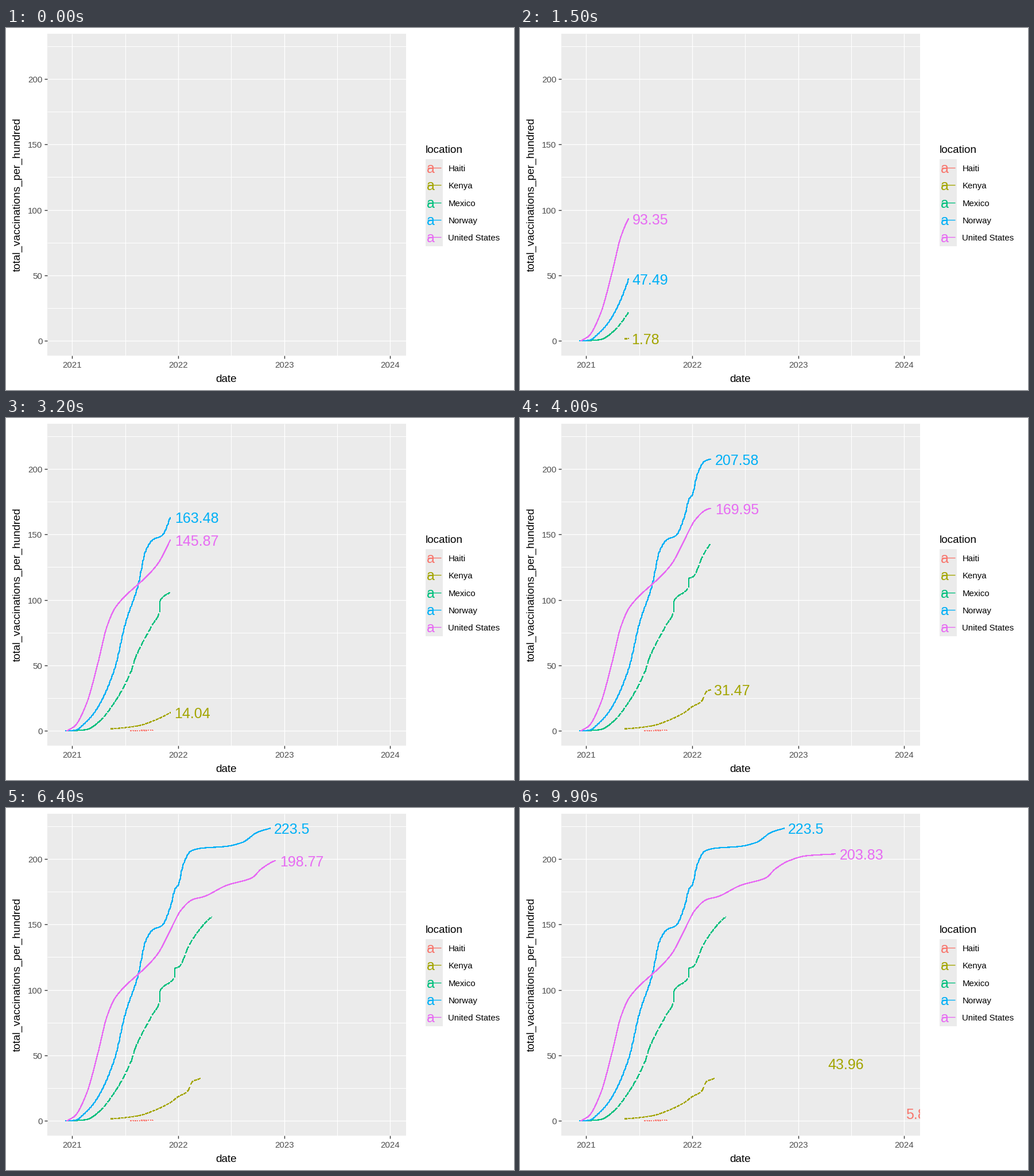
A matplotlib script for the animation above (10 s loop, 885x632 px).

```python
import numpy as np
import matplotlib.pyplot as plt
from matplotlib.animation import FuncAnimation
from matplotlib.patches import Rectangle

W, H, DPI = 885, 632, 100
FRAMES = 100
X0, STEP = 103.7, 5.71            # reveal position in pixels per frame
ZERO, UNIT = 546.3, 2.2865        # pixel row of 0, pixels per value unit
WEEK = 3.54                       # pixels per week
SMALL, TITLE, BIG = 15, 19, 25
DATA_LINE, MAJOR, MINOR = 1.2, 1.4, 1

plt.rcParams["font.family"] = "Liberation Sans"


def pt(px):
    return px * 72 / DPI


def row(value):
    return ZERO - UNIT * np.asarray(value)


def smooth(knots):
    """Monotone cubic curve through a few key points."""
    kx, kv = np.array(knots, float).T
    h = np.diff(kx)
    d = np.diff(kv) / h
    inner = 2 * d[:-1] * d[1:] / np.maximum(d[:-1] + d[1:], 1e-9)
    m = np.concatenate([[d[0]], inner, [d[-1]]])

    def curve(x):
        x = np.clip(x, kx[0], kx[-1])
        i = np.clip(np.searchsorted(kx, x, side="right") - 1, 0, len(h) - 1)
        t = (x - kx[i]) / h[i]
        return (kv[i] + h[i] * t * (m[i] + t * (
            3 * d[i] - 2 * m[i] - m[i + 1]
            + t * (m[i] + m[i + 1] - 2 * d[i]))))

    return curve


class Series:
    def __init__(self, color, knots, final=None, dash=None, solid=0, ripple=0):
        self.color, self.final = color, final
        self.first, self.last = knots[0][0], knots[-1][0]
        self.curve = smooth(knots)
        self.dash, self.solid = dash, solid
        x = np.append(np.arange(self.first, self.last, .25), self.last)
        warped = x + ripple * np.sin(2 * np.pi * x / WEEK)
        self.x = x
        self.y = np.where(self.reported(x), row(self.curve(warped)), np.nan)

    def reported(self, x):
        """True where data exist: regular dashes after a solid start."""
        inside = (x >= self.first) & (x <= self.last)
        if self.dash:
            start, length, period = self.dash
            inside &= (x < self.solid) | ((x - start) % period < length)
        return inside

    def spot(self, tip):
        if self.final and tip >= self.final[0]:
            return self.final
        if self.reported(np.float64(tip)):
            return tip, float(self.curve(tip))
        return None


# Key points are (x pixel, value); dash is (start, length, period)
SERIES = {
    "Haiti": Series(
        "#F8766D", [(217, .1), (230, .25), (256, .5)],
        final=(667.5, 5.85), dash=(217, 1.6, 3.8)),
    "Kenya": Series(
        "#A3A500",
        [(182, 1.6), (189.35, 1.78), (230, 3.9), (258, 7.9), (286.42, 14.04),
         (300, 18.5), (316, 22.5), (325, 30), (339, 32.5)],
        final=(530.5, 43.96), dash=(188.35, 4.3, 6.067)),
    "Mexico": Series(
        "#00BF7D",
        [(111, 0), (140, 1), (162, 7), (189.35, 22), (218, 45.5), (226, 56.5),
         (255, 81), (267.6, 91), (268, 99), (294, 110), (294.4, 116.5),
         (301, 117.5), (320, 135), (345, 150.3), (358.5, 156)],
        dash=(190, 5.17, 6.471), solid=165, ripple=.3),
    "Norway": Series(
        "#00B0F6",
        [(103.8, 0), (120, .5), (140, 7), (160, 18), (189.35, 47.49),
         (208, 82), (230, 111), (243, 137), (255, 145.7), (272, 149.3),
         (286.42, 163.48), (295, 177.5), (300, 180), (309, 196), (322, 206),
         (340, 208.2), (383.49, 209.64), (412, 212.7), (438, 220.4),
         (460.5, 223.5)],
        final=(460.5, 223.5), ripple=.45),
    "United States": Series(
        "#E76BF3",
        [(106, 0), (120, 3.8), (140, 20.5), (160, 51.5), (175, 78.5),
         (189.35, 93.35), (205, 101.8), (245, 118), (265, 128),
         (286.42, 145.87), (305, 161), (325, 169), (345, 171.3),
         (383.49, 179.73), (428, 185.5), (445, 192.5), (469.14, 198.77),
         (500, 202.5), (549.08, 203.83)],
        final=(549.08, 203.83)),
}

fig = plt.figure(figsize=(W / DPI, H / DPI), dpi=DPI, facecolor="white")
ax = fig.add_axes([0, 0, 1, 1])
ax.set(xlim=(0, W), ylim=(H, 0))
ax.axis("off")


def rule(xs, ys, color, px):
    ax.plot(xs, ys, color=color, lw=pt(px), solid_capstyle="butt")


def write(x, y, text, px, color="black", **kw):
    return ax.text(x, y, text, fontsize=pt(px), color=color,
                   va="baseline", **kw)


# Panel, grid and axes
L, R, T, B = 72, 697, 10, 571.5
YEAR_X, YEAR = 115.3, 184.7
panel = Rectangle((L, T), R - L, B - T, fc="#EBEBEB", ec="none")
ax.add_patch(panel)

for i in range(3):
    x = YEAR_X + YEAR * (i + .5)
    rule([x, x], [T, B], "white", MINOR)
for v in range(25, 226, 50):
    rule([L, R], [row(v)] * 2, "white", MINOR)
for v in range(0, 201, 50):
    y = row(v)
    rule([L, R], [y, y], "white", MAJOR)
    rule([L - 5, L], [y, y], "#333333", MAJOR)
    write(63.5, y + 6, str(v), SMALL, "#4D4D4D", ha="right")
for i in range(4):
    x = YEAR_X + YEAR * i
    rule([x, x], [T, B], "white", MAJOR)
    rule([x, x], [B, B + 5], "#333333", MAJOR)
    write(x, 593, str(2021 + i), SMALL, "#4D4D4D", ha="center")

write(384, 618, "date", TITLE, ha="center")
write(24.5, 290.5, "total_vaccinations_per_hundred", TITLE, ha="center",
      rotation=90, rotation_mode="anchor")

# Legend
KEY = 30.3
write(730.5, 218, "location", TITLE)
ax.add_patch(Rectangle((731, 229), KEY, 5 * KEY, fc="#EBEBEB", ec="none"))
for i, (name, s) in enumerate(SERIES.items()):
    mid = 229 + KEY * (i + .5)
    rule([734, 758], [mid, mid], s.color, MAJOR)
    write(732.6, mid + 8.8, "a", BIG, s.color)
    write(770.3, mid + 6, name, SMALL)

for s in SERIES.values():
    s.line, = ax.plot([], [], color=s.color, lw=pt(DATA_LINE),
                      antialiased=False, solid_capstyle="butt", zorder=3)
    s.label = write(0, 0, "", BIG, s.color, zorder=4, clip_on=True)
    s.label.set_clip_path(panel)


def update(frame):
    tip = X0 + STEP * frame
    artists = []
    for s in SERIES.values():
        shown = s.x <= tip
        s.line.set_data(s.x[shown], s.y[shown])
        spot, text = s.spot(tip), ""
        if spot:
            x, v = spot
            text = f"{round(v, 2):g}"
            width = BIG * sum(.278 if c == "." else .556 for c in text)
            s.label.set_position((x + .1 * width, row(v) + 10))
        s.label.set_text(text)
        artists += [s.line, s.label]
    return artists


anim = FuncAnimation(fig, update, frames=FRAMES, interval=100,
                     init_func=lambda: update(0), repeat=True, repeat_delay=0)
plt.show()
```
